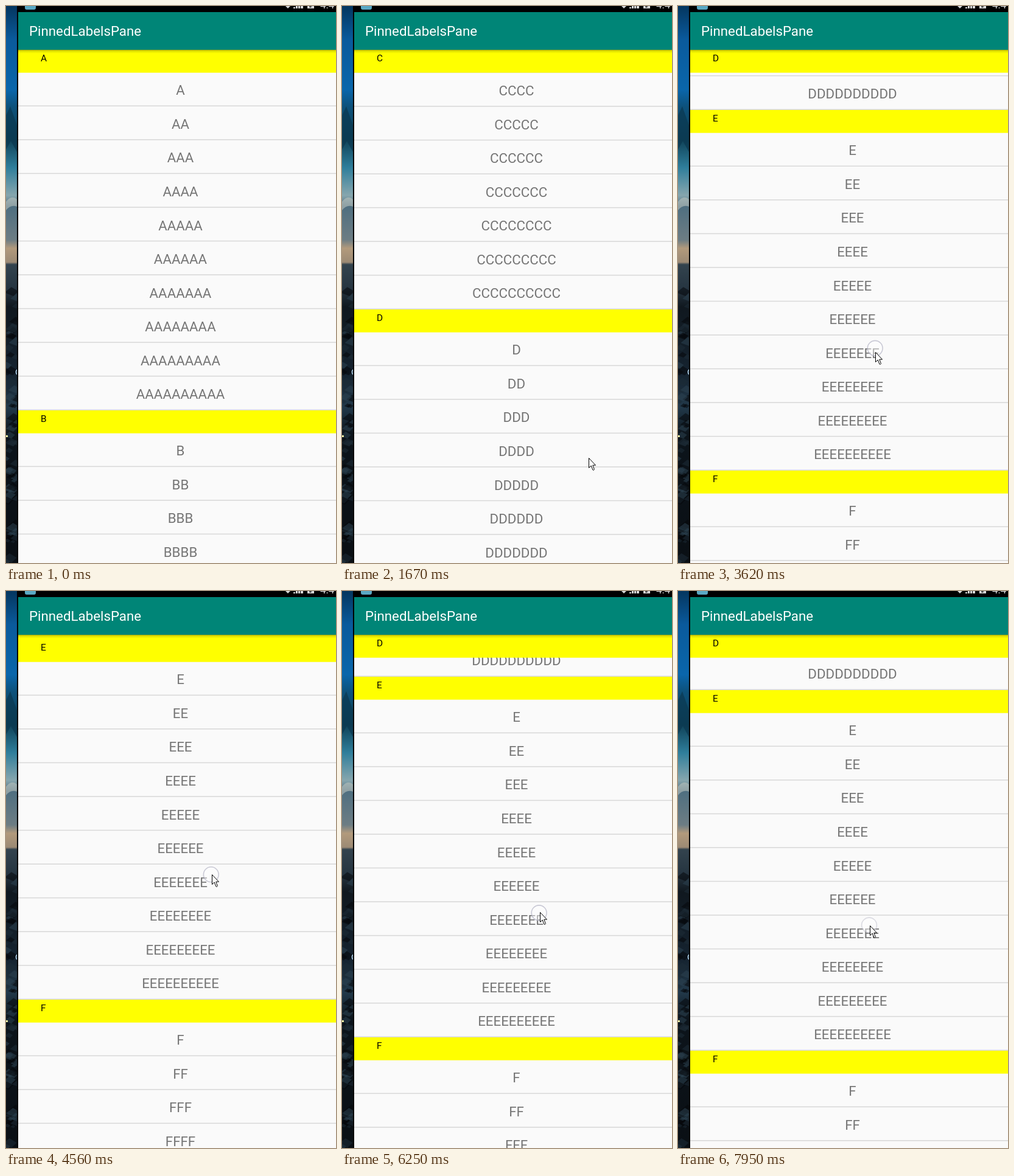
Animation, 542 px wide and 916 px high, one loop 8000 ms. Source, as an HTML page:

```html
<!DOCTYPE html>
<html lang="en">
<head>
<meta charset="utf-8">
<title>Pinned section list</title>
<style>
  html, body { margin: 0; width: 100%; height: 100%; overflow: hidden; background: #000; }
  svg { display: block; width: 542px; height: 916px; }
  text { font-family: Roboto, "Noto Sans", sans-serif; }
  .row { font-size: 22.3px; fill: #757575; text-anchor: middle; }
  .label { font-size: 15.4px; fill: #000; }
</style>
</head>
<body>
<svg viewBox="0 0 542 916" xmlns="http://www.w3.org/2000/svg">
  <defs>
    <linearGradient id="sky" x1="0" y1="0" x2="0" y2="1">
      <stop offset="0" stop-color="#04365f"/>
      <stop offset=".06" stop-color="#0a5a9c"/>
      <stop offset=".15" stop-color="#0a66ab"/>
      <stop offset=".18" stop-color="#0d527c"/>
      <stop offset=".24" stop-color="#0f4258"/>
      <stop offset=".29" stop-color="#2f7e9b"/>
      <stop offset=".34" stop-color="#86a6ae"/>
      <stop offset=".36" stop-color="#4f6f80"/>
      <stop offset=".42" stop-color="#6d7d84"/>
      <stop offset=".435" stop-color="#b29a7c"/>
      <stop offset=".46" stop-color="#9c8a74"/>
      <stop offset=".464" stop-color="#33434e"/>
      <stop offset=".51" stop-color="#253440"/>
      <stop offset=".54" stop-color="#10181f"/>
      <stop offset=".66" stop-color="#152330"/>
      <stop offset=".72" stop-color="#22394a"/>
      <stop offset=".77" stop-color="#0c141b"/>
      <stop offset="1" stop-color="#0a0f14"/>
    </linearGradient>
    <linearGradient id="shade" x1="0" y1="0" x2="0" y2="1">
      <stop offset="0" stop-color="#000" stop-opacity=".34"/>
      <stop offset=".35" stop-color="#000" stop-opacity=".12"/>
      <stop offset="1" stop-color="#000" stop-opacity="0"/>
    </linearGradient>
    <clipPath id="strip"><rect width="18" height="916"/></clipPath>
    <clipPath id="view"><rect x="20" y="72" width="522" height="844"/></clipPath>
  </defs>

  <g clip-path="url(#strip)">
    <rect width="18" height="916" fill="url(#sky)"/>
    <g id="rocks"></g>
    <path d="M0 180L7 165L18 196V240L8 222L0 236Z" fill="#0a3850" opacity=".7"/>
    <path d="M0 322Q9 310 18 318V330Q8 326 0 336Z" fill="#b9c2bd" opacity=".6"/>
    <rect y="706" width="3" height="3" fill="#e8e8a0"/>
    <path d="M18 598Q15 602 18 606" fill="none" stroke="#bfe4ff" stroke-width="1.5"/>
  </g>

  <rect x="20" y="72" width="522" height="844" fill="#fafafa"/>
  <g clip-path="url(#view)">
    <g id="rows"></g>
    <g id="heads"></g>
    <rect x="20" y="72" width="522" height="6" fill="url(#shade)"/>
  </g>

  <rect x="18" width="524" height="10" fill="#000"/>
  <rect x="31" y="-12" width="18" height="18" rx="3" fill="#5aa9c4"/>
  <g fill="#d8d8d8">
    <path d="M459 0H467L463 4Z"/>
    <path d="M472 4V2H475V4ZM476 4V0H479V4ZM480 4V0H483V4ZM484 4V0H488V4Z"/>
    <rect x="495" y="-7" width="11" height="11"/>
    <text x="516" y="4" font-size="17">4:41</text>
  </g>
  <path d="M498 0L503 1L499 3Z" fill="#222"/>
  <rect x="20" y="10" width="522" height="62" fill="#008577"/>
  <text x="38" y="49.3" font-size="22.3" fill="#fff">PinnedLabelsPane</text>

  <circle id="touch" r="12.4" fill="#fff" fill-opacity=".45" stroke="#b4b4c4" stroke-opacity=".7" stroke-width="1.6"/>
  <path id="pointer" d="M.5 .5V16.5L4.2 13L7 20Q8.5 21 9.5 19.2L6.8 12.2H11.5Z" fill="#fff" stroke="#000" stroke-width="1"/>
</svg>
<script>
const LOOP = 8000, TOP = 72, HEAD = 37.5, ROW = 55.55, SECTION = HEAD + 10 * ROW;
const GRAB = 2831, DRAG_START = 2950;

// Screen updates come in bursts: start, end, number of updates.
const bursts = [
  [430, 590, 3], [1140, 1290, 3], [1670, 1990, 5], [2540, 2770, 4], [3000, 3770, 11],
  [4080, 4720, 9], [4950, 5710, 11], [5790, 6020, 4], [6250, 6880, 9], [7030, 7790, 11]
];
// time, x, y
const pointerKeys = [
  [430, 427, 887], [590, 405, 743], [2463, 405, 743], [2770, 355, 398], [2923, 355, 398],
  [3616, 324, 569], [3770, 320, 585], [4000, 320, 585], [4400, 336, 471], [4560, 338, 466],
  [4720, 340, 462], [4874, 340, 462], [5406, 334.5, 491.5], [5482, 334, 493], [5710, 333, 497],
  [5713, 333, 497], [6020, 325, 535], [6171, 325, 535], [6720, 322, 484], [6880, 322, 481.5],
  [6954, 322, 481.5], [7640, 315, 547], [7790, 315, 550]
];
// time, offset
const flingKeys = [[1065, 0], [1290, 1010], [1590, 1010], [1670, 1352], [1990, 2425]];

const $ = id => document.getElementById(id);
const make = (parent, tag, attrs, text = "") => {
  const node = document.createElementNS("http://www.w3.org/2000/svg", tag);
  for (const key in attrs) node.setAttribute(key, attrs[key]);
  node.textContent = text;
  return parent.appendChild(node);
};
const move = (node, x, y) => node.setAttribute("transform", `translate(${x} ${y})`);

function sample(keys, t) {
  const next = keys.findIndex(key => key[0] > t);
  if (next < 0) return keys[keys.length - 1].slice(1);
  if (next === 0) return keys[0].slice(1);
  const a = keys[next - 1], b = keys[next], u = (t - a[0]) / (b[0] - a[0]);
  return a.slice(1).map((v, i) => v + (b[i + 1] - v) * u);
}

function snap(t) {
  const burst = bursts.filter(b => b[0] <= t).pop();
  if (!burst) return 0;
  const [start, end, count] = burst, step = (end - start) / (count - 1);
  return start + step * Math.min(count - 1, Math.floor((t - start) / step + 0.1));
}

let seed = 7;
const random = () => (seed = seed * 16807 % 2147483647) / 2147483647;
for (let i = 0; i < 70; i++) {
  const x = random() * 18, y = 470 + random() * 446, w = 4 + random() * 8;
  make($("rocks"), "path", {
    d: `M${x - w} ${y}l${w} ${-w * .8}l${w} ${w * .6}l${-w * .7} ${w * .7}z`,
    fill: ["#05080b", "#1d2b36", "#2c4250"][i % 3], opacity: .55
  });
}

const heads = [..."ABCDEF"].map((letter, s) => {
  for (let i = 0; i < 10; i++) {
    const y = TOP + s * SECTION + HEAD + i * ROW;
    make($("rows"), "text", { class: "row", x: 286.5, y: y + 36.8 }, letter.repeat(i + 1));
    make($("rows"), "rect", { x: 20, y: y + ROW - 1.5, width: 522, height: 1.5, fill: "#d8d8d8" });
  }
  const head = make($("heads"), "g", {});
  make(head, "rect", { x: 20, width: 522, height: HEAD + .2, fill: "#ff0" });
  make(head, "text", { class: "label", x: 57, y: 19.3 }, letter);
  return head;
});

function draw(time) {
  const t = snap(time);
  const [x, y] = sample(pointerKeys, t);
  const [lastX, lastY] = sample(pointerKeys, t - 77);
  const settled = time - t > 90 ? 0 : 1;
  const vx = (x - lastX) * settled, vy = (y - lastY) * settled;
  const dragging = t >= DRAG_START;

  // The list trails the finger a little while it moves.
  const trail = t < 4000 ? vy * .6 : 0;
  const offset = Math.round(dragging ? Math.min(2425, GRAB - y + trail) : sample(flingKeys, t)[0]);

  move($("rows"), 0, -offset);
  heads.forEach((head, s) => {
    const natural = TOP + s * SECTION - offset;
    move(head, 0, Math.min(Math.max(natural, TOP), natural + SECTION - HEAD));
  });

  const shown = time >= bursts[0][0];
  $("pointer").style.display = shown ? "" : "none";
  $("touch").style.display = dragging ? "" : "none";
  move($("pointer"), Math.round(x), Math.round(y));
  move($("touch"), x - 1 - vx * .2, y - .5 - vy * .3);
  $("touch").setAttribute("stroke-opacity", time >= 7870 ? .45 : .7);
}

function tick() {
  draw(performance.now() % LOOP);
  requestAnimationFrame(tick);
}
tick();
</script>
</body>
</html>
```
